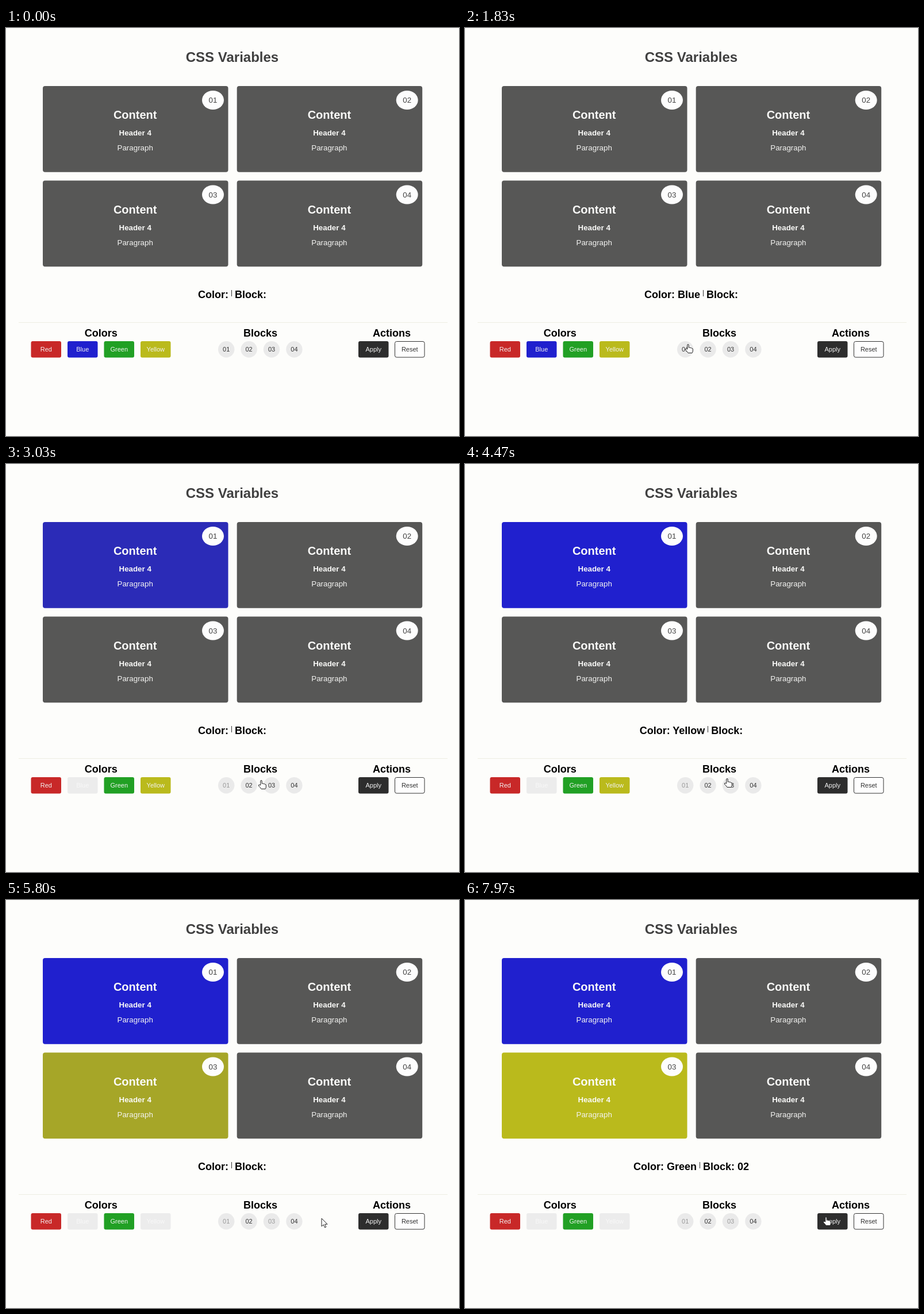
Animation, 788 px wide and 710 px high, one loop 8000 ms. Source, as an HTML page:

```html
<!DOCTYPE html>
<html lang="en">
<head>
<meta charset="utf-8">
<title>CSS Variables</title>
<style>
  html, body { margin: 0; width: 100%; height: 100%; overflow: hidden; background: #fdfdfb; }
  svg { display: block; font-family: "Liberation Sans", Arial, sans-serif; }
  .b { font-weight: bold; }
</style>
</head>
<body>
<svg id="stage" width="788" height="710" viewBox="0 0 788 710"></svg>
<script>
const LOOP = 8000, FADE = 400;
const GRAY = [87, 87, 86];
const COLORS = {
  Red: [200, 40, 40], Blue: [32, 32, 206], Green: [33, 160, 36], Yellow: [186, 186, 28]
};
const stage = document.getElementById('stage');
const rgb = c => `rgb(${c.map(Math.round)})`;

function add(tag, attrs, parent = stage) {
  const el = document.createElementNS('http://www.w3.org/2000/svg', tag);
  for (const k in attrs) el.setAttribute(k, attrs[k]);
  return parent.appendChild(el);
}

function label(text, x, y, size, fill, bold, anchor = 'middle') {
  const el = add('text', { x, y, fill, 'font-size': size, 'text-anchor': anchor, class: bold ? 'b' : '' });
  el.textContent = text;
  return el;
}

function button(text, x, fill, ink, stroke = 'none') {
  const inset = stroke === 'none' ? 0 : 0.5;
  const box = add('rect', {
    x: x + inset, y: 545 + inset, width: 52.5 - 2 * inset, height: 28.5 - 2 * inset, rx: 3, fill, stroke
  });
  spots.push([x, x + 52.5]);
  return { box, text: label(text, x + 26.3, 563, 11, ink) };
}

// Page
const spots = [];
label('CSS Variables', 393.5, 59, 24, '#404040', true);

const cards = [0, 1, 2, 3].map(i => {
  const x = 64 + (i % 2) * 337.7, y = 101 + (i >> 1) * 164.5, mid = x + 160.7;
  const card = add('rect', { x, y, width: 322.5, height: 149.7, rx: 4 });
  add('ellipse', { cx: x + 296, cy: y + 24.5, rx: 19, ry: 16.5, fill: '#fdfdfd' });
  label('0' + (i + 1), x + 296, y + 29, 13.33, '#444');
  label('Content', mid, y + 57, 20, '#fafaf8', true);
  label('Header 4', mid, y + 86, 13.33, '#fafaf8', true);
  label('Paragraph', mid, y + 112, 13.33, '#f4f4f2');
  return card;
});

const left = label('', 0, 470, 18, '#000', true, 'start');
const right = label('', 0, 470, 18, '#000', true, 'start');
const bar = add('rect', { y: 456, width: 1, height: 11, fill: '#333' });

add('rect', { x: 22, y: 512, width: 746, height: 1, fill: '#eeeee2' });
label('Colors', 165.3, 537, 18, '#000', true);
label('Blocks', 442.5, 537, 18, '#000', true);
label('Actions', 671, 537, 18, '#000', true);

const swatches = {};
Object.keys(COLORS).forEach((name, i) => {
  swatches[name] = button(name, 43.5 + i * 63.5, rgb(COLORS[name]), '#f2f2f2');
});
const dots = [0, 1, 2, 3].map(i => {
  const cx = 383.2 + i * 39.4;
  add('circle', { cx, cy: 559.2, r: 14.2, fill: '#eaeaea' });
  spots.push([cx - 14, cx + 14]);
  return label('0' + (i + 1), cx, 563, 11, '#333');
});
button('Apply', 613, '#2d2d2d', '#f2f2f2');
button('Reset', 676, '#fefefe', '#333', '#333');

const pen = { fill: '#fff', stroke: '#222', 'stroke-width': 1, 'stroke-linejoin': 'round' };
const arrow = add('path', { ...pen, d: 'M0 0V14L3.3 11L5.6 16L7.8 15L5.6 10.2H10Z' });
const hand = add('path', {
  ...pen,
  d: 'M-1.2 8V1Q-1.2-.5 0-.5T1.2 1V5.2Q3-.0+5.2 3.8 5.6Q5.6 5 6.2 6.3Q8.3 6 8.3 8V11Q8.3 13 7 14.5H0Q-2 11.5-4.6 9Q-5.2 7-3 7.2Z'
    .replace('Q3-.0+5.2 3.8 5.6', 'Q3.2 4.4 3.8 5.6')
});

// Story: what gets clicked, and when
const rounds = [
  { color: 'Blue', block: 1, pick: 1050, aim: 1900, apply: 2830 },
  { color: 'Yellow', block: 3, pick: 3700, aim: 4630, apply: 5602 },
  { color: 'Green', block: 2, pick: 6670, aim: 7270, apply: LOOP }
];

// Pointer path: time, x, y
const path = [
  [60, 470, 44], [800, 136, 559], [1200, 134, 559], [1670, 388, 551], [1900, 388, 551],
  [2500, 608, 567], [2670, 634, 567], [2830, 634, 567], [3030, 445, 551], [3400, 264, 559],
  [3900, 262, 558], [4470, 456, 548], [4630, 456, 548], [5370, 625, 552], [5630, 625, 552],
  [6250, 212, 561], [6570, 208, 559], [6690, 208, 559], [7030, 420, 556], [7270, 420, 556],
  [7940, 628, 552], [LOOP, 628, 552]
];

const slope = (i, k) => path[i] && path[i + 1]
  ? (path[i + 1][k] - path[i][k]) / (path[i + 1][0] - path[i][0]) : 0;

// Monotone tangent, so the pointer never overshoots
function tangent(i, k) {
  const a = slope(i - 1, k), b = slope(i, k);
  return a * b > 0 ? 2 * a * b / (a + b) : 0;
}

function pointerAt(t) {
  let i = 0;
  while (i < path.length - 2 && t >= path[i + 1][0]) i++;
  const span = path[i + 1][0] - path[i][0], u = (t - path[i][0]) / span, v = 1 - u;
  return [1, 2].map(k =>
    v * v * (1 + 2 * u) * path[i][k] + u * u * (3 - 2 * u) * path[i + 1][k] +
    span * u * v * (v * tangent(i, k) - u * tangent(i + 1, k)));
}

// The CSS "ease" curve
function ease(x) {
  if (x <= 0) return 0;
  if (x >= 1) return 1;
  let lo = 0, hi = 1, s;
  for (let n = 0; n < 20; n++) {
    s = (lo + hi) / 2;
    const bx = 0.75 * s * (1 - s) + s * s * s;
    if (bx < x) lo = s; else hi = s;
  }
  return 0.3 * s * (1 - s) ** 2 + 3 * s * s * (1 - s) + s ** 3;
}

function setStatus(color, block) {
  left.textContent = 'Color:' + (color && ' ' + color);
  right.textContent = 'Block:' + (block && ' 0' + block);
  const w = left.getComputedTextLength(), gap = 11;
  const x = 393.5 - (w + gap + right.getComputedTextLength()) / 2;
  left.setAttribute('x', x);
  bar.setAttribute('x', Math.round(x + w + 5));
  right.setAttribute('x', x + w + gap);
}

function render(t) {
  let color = '', block = '';
  cards.forEach(c => c.setAttribute('fill', rgb(GRAY)));
  for (const r of rounds) {
    const done = t >= r.apply, { box, text } = swatches[r.color];
    if (!done && t >= r.pick) color = r.color;
    if (!done && t >= r.aim) block = r.block;
    const p = ease((t - r.apply) / FADE), to = COLORS[r.color];
    cards[r.block - 1].setAttribute('fill', rgb(GRAY.map((g, k) => g + (to[k] - g) * p)));
    box.setAttribute('fill', done ? '#ececec' : rgb(to));
    text.setAttribute('fill', done ? '#f8f8f8' : '#f2f2f2');
    dots[r.block - 1].setAttribute('fill', done ? '#999' : '#333');
  }
  setStatus(color, block);

  const [x, y] = pointerAt(t), shown = t >= path[0][0];
  const over = y > 541 && y < 577 && spots.some(s => x > s[0] - 4 && x < s[1] + 4);
  for (const [el, on] of [[hand, over], [arrow, !over]]) {
    el.setAttribute('visibility', shown && on ? 'visible' : 'hidden');
    el.setAttribute('transform', `translate(${Math.round(x)} ${Math.round(y)})`);
  }
}

const start = performance.now();
function tick() {
  render((performance.now() - start) % LOOP);
  requestAnimationFrame(tick);
}
tick();
</script>
</body>
</html>
```
